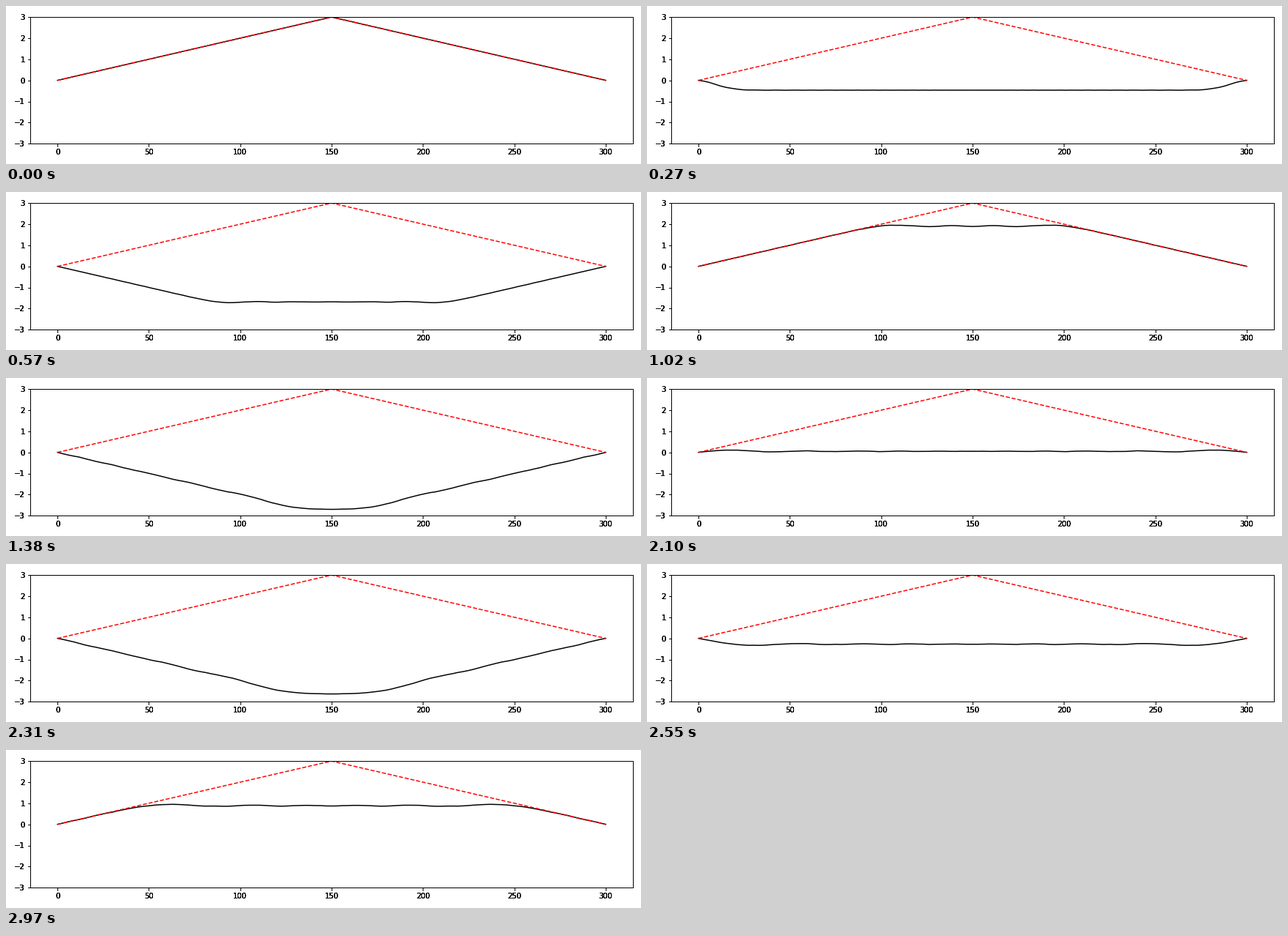
A matplotlib script that plays this animation: 864 by 216 pixels, repeating every 3000 ms.

```python
import numpy as np
import matplotlib.pyplot as plt
from matplotlib.animation import FuncAnimation

W, H, DPI = 864, 216, 72
FRAMES, INTERVAL = 100, 30
LENGTH, HEIGHT = 300, 3
BEADS = 100
SPEED = 19.25  # distance a wave travels per frame

plt.rcParams["font.family"] = "DejaVu Sans"
plt.rcParams["font.size"] = 10

# Plucked string as a chain of beads, solved by its normal modes.
x = np.linspace(0, LENGTH, BEADS + 1)
pluck = HEIGHT * (1 - np.abs(2 * x / LENGTH - 1))
n = np.arange(1, BEADS)
modes = np.sin(np.pi * np.outer(n, x) / LENGTH)
amps = 2 / BEADS * modes @ pluck
omega = 2 * SPEED * BEADS / LENGTH * np.sin(np.pi * n / (2 * BEADS))


def string_at(t):
    return (amps * np.cos(omega * t)) @ modes


fig = plt.figure(figsize=(W / DPI, H / DPI), dpi=DPI, facecolor="white")
BOX = [32.8 / W, 27.8 / H, 820.5 / W, 173.1 / H]


def add_frame(name):
    ax = fig.add_axes(BOX, label=name, facecolor="none")
    ax.set_xlim(-15, 315)
    ax.set_ylim(-3, 3)
    ax.set_xticks(range(0, 301, 50))
    ax.set_yticks(range(-3, 4))
    return ax


ax = add_frame("plot")
string, = ax.plot(x, pluck, "k", lw=1.5)
ax.plot(x, pluck, "r--", lw=1.5)

# Stacked copies of the axes give the labels their heavy edges.
for i in range(3):
    add_frame(f"overlay{i}")


def update(i):
    string.set_ydata(string_at(i))
    return string,


anim = FuncAnimation(fig, update, frames=FRAMES, interval=INTERVAL,
                     repeat=True, repeat_delay=0, blit=True)
plt.show()
```
